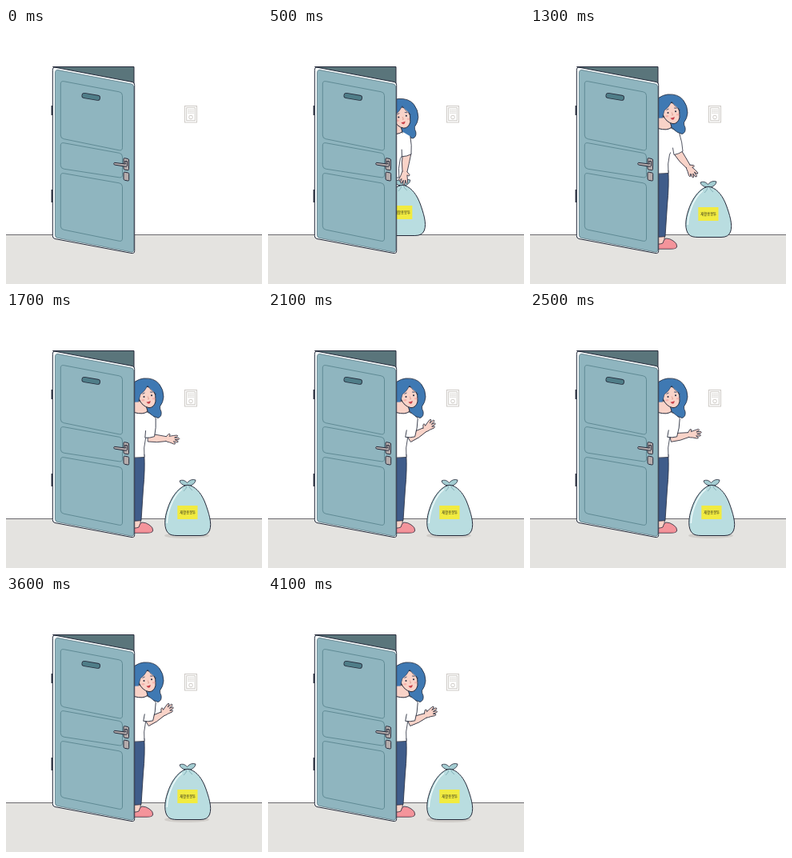
Recreate the animation shown at these times as an HTML page. Size 320x320 px, loop 4200 ms.

```html
<!DOCTYPE html>
<html lang="ko">
<head>
<meta charset="utf-8">
<title>Door</title>
<style>
  html, body { margin: 0; width: 100%; height: 100%; overflow: hidden; background: #fff; }
  svg { display: block; width: 100vw; height: 100vh; }
  .ink { stroke: #262b3b; stroke-width: 1; stroke-linejoin: round; stroke-linecap: round; }
  .thin { stroke-width: .8; }
  .line { fill: none; }
  .skin { fill: #f9d3c8; }
  .hair { fill: #3f79b3; }
  .panel { fill: none; stroke: #547f8a; stroke-width: .8; }
  .metal { fill: #b5acac; }
  .bell { fill: none; stroke: #c9c5c0; stroke-width: .9; }
  .label { font: 500 4.3px "Noto Sans CJK KR", "Noto Sans CJK", sans-serif; fill: #2c2c1c; text-anchor: middle; }
</style>
</head>
<body>
<svg viewBox="0 0 320 320">
  <defs>
    <clipPath id="outside"><rect x="160" y="0" width="160" height="320"/></clipPath>
  </defs>

  <rect width="320" height="320" fill="#fff"/>
  <rect y="258" width="320" height="62" fill="#e4e3e0"/>
  <path d="M0 258.500H320" stroke="#6c6b6e" stroke-width="1"/>

  <g class="bell">
    <rect x="223.500" y="97.500" width="15" height="20.500"/>
    <rect x="225.700" y="99.700" width="10.600" height="16"/>
    <path d="M227.500 102.300H235M227.500 104.300H235M227.500 106.300H235" stroke-dasharray="1.3 .7" stroke-width="1.100"/>
    <circle cx="231" cy="111.500" r="2.300"/>
  </g>

  <g clip-path="url(#outside)">
    <ellipse id="shadow" cx="226" cy="279.500" rx="28" ry="3.600" fill="#d0cdc9"/>

    <g id="legs">
      <path class="ink thin skin" d="M150 254H168.500L168 266L172 271H150Z"/>
      <path class="ink thin" fill="#3f5c8a" d="M145 178H172.800Q174 196 171.500 222L169 260.500Q162 262 145 260.500Z"/>
      <path class="ink thin" fill="#f4949b" d="M152 270Q161 271 166 269Q167 264 170 263Q175 263 179 266Q184 269 183.700 273Q183.500 276.200 176 276.200H152Z"/>
      <path d="M154 275.300H181" stroke="#dc7a84" stroke-width=".8"/>
    </g>

    <g id="girl">
      <path class="ink thin" fill="#fff" d="M145 127L170 123Q184 127 187 133L179 150L174.500 158Q171.500 170 173 181.500Q160 183 145 181Z"/>
      <path class="ink thin hair" d="M152 97Q160 84.500 172 83Q185 82 191.500 90Q197 97 197 106Q196.500 113 192.500 118Q192 121 194 124.500Q195 131 190 132.500Q183 131 178 125L163 118L150 118Z"/>
      <path class="ink skin" d="M160 111L165 110L175 117L177 124Q172 129 160 125.500Z" stroke-width=".6"/>
      <path class="ink skin" d="M166 98Q176 89 184 97Q188 104 187 112Q185 119.500 179 119.700Q170 118.500 166 108Z" stroke-width=".6"/>
      <path class="hair" d="M158 94Q166 84 178 86Q188 89 191 103Q183 100 177 92Q173 100 168 103Q166.500 109 165.500 112.500L158 113Z"/>
      <path class="line" d="M165.500 112.500Q166.500 109 168 103Q173 100 177 92Q181 99 188 103" stroke="#262b3b" stroke-width=".5"/>
      <path class="line" d="M170.500 102.500L173.500 101M180 100L183.300 100.300" stroke="#26395d" stroke-width=".8"/>
      <circle cx="172.500" cy="106" r="1" fill="#20263a"/>
      <circle cx="182" cy="104.300" r="1" fill="#20263a"/>
      <path class="line" d="M177.200 105.500L178.500 108.700L177.200 109" stroke="#cf8176" stroke-width=".6"/>
      <path d="M175.500 112.300Q178 112.700 180.700 111Q180.500 114.800 178.300 114.800Q176.300 114.600 175.500 112.300Z" fill="#c9414a"/>
      <ellipse cx="171.300" cy="110.300" rx="1.900" ry="1.300" fill="#f7b3ad"/>
      <ellipse cx="184.600" cy="108.300" rx="1.600" ry="1.200" fill="#f7b3ad"/>
    </g>

    <g id="bag">
      <path class="ink thin" fill="#a4cdd2" d="M225 217Q218 216 217 211Q222 208.500 226.500 213.500Q231 208 237 210Q236.500 215.500 229 217.300Z"/>
      <path class="ink" fill="#b9dde0" d="M223.500 217C214 221 206 233 202 246C198 257 197 271 203 276.500Q206 279.500 214 279.500H243Q252 279.500 254.500 273C258 264 253 250 249.500 240C245.500 229 239 220 230.500 217Q227 215.500 223.500 217Z"/>
      <path class="line" d="M220 221.500Q211.500 228 206 242Q201.500 254 201.300 264" stroke="#eef9fa" stroke-width="1.500"/>
      <path class="line" d="M226 217.500Q225.500 221 222 224M228.500 217.500Q230 221 233 223" stroke="#6f9ea8" stroke-width=".7"/>
      <rect x="214.300" y="242" width="25.200" height="17" fill="#f1eb40"/>
      <text class="label" x="227.200" y="252.300">재활용봉투</text>
    </g>

    <!-- Origin at the shoulder, forearm origin at the elbow -->
    <g id="arm">
      <g id="fore">
        <path class="ink thin skin" d="M-3 -4.800Q10 -4 21 -3V2.700Q9 6 -2 5.500Z"/>
        <path id="hand" class="ink thin skin" d="M20 -3L23 -6.500Q25 -7.200 24.700 -5.200L24 -3.600L29 -4.800L33.500 -5.500Q35.500 -4.500 33.500 -3.500L30.500 -2.300L36 -2.200Q37.500 -1 36 -.2L31 .2L35 1.700Q36 3.200 34 3.400L29.500 2.500L32 4.700Q32 6.200 30 5.700L25 4Q22 3.700 20 2.700"/>
      </g>
      <path fill="#fff" d="M-5 -6L5 -2L9 20Q4 23.500 -2 24.500L-8 20Z"/>
      <path class="ink thin line" d="M4.800 -2Q8.500 9 9 20Q4 23.500 -2 24.500L-3.500 16"/>
    </g>
  </g>

  <path class="ink" fill="#5a757b" d="M59 48.500H160V70L61 51Z"/>
  <path d="M57.500 97V109M57.500 202V218" stroke="#262b3b" stroke-width="1.800"/>
  <path class="ink" fill="#f4f9fa" stroke-width="1.400" d="M58.300 52Q58.300 48.800 62 49.300L158 67.500Q160.700 68.200 160.700 71.500V278.500Q160.700 282.200 157 281.500L61 263.500Q58.300 262.800 58.300 260Z"/>
  <path fill="#8fb5bf" stroke="#395b68" stroke-width=".6" d="M61.500 56Q61.500 52 65 52.500L157 70Q159.600 70.600 159.600 74V278Q159.600 280.700 156.500 280L64.500 262.500Q61.500 262 61.500 259Z"/>
  <g id="panels"></g>
  <path d="M98 84.500L114.500 87.300" stroke="#262b3b" stroke-width="7" stroke-linecap="round"/>
  <path d="M98 84.500L114.500 87.300" stroke="#4f7d88" stroke-width="5.400" stroke-linecap="round"/>
  <path class="ink metal" d="M147 163.500Q147 162.500 148.300 162.700L152.300 163.500Q153.500 163.800 153.500 165V176.500Q153.500 178 152 177.700L148 177Q147 176.700 147 175.500Z"/>
  <path class="ink metal" d="M149 166.500H151.500V172.500Q151 173.500 149 173.200L135.500 171Q133.800 169.800 135.500 168.300L149 170Z"/>
  <path class="ink metal" d="M147 181.500Q147 180 148.500 180.200L152.500 181Q153.700 181.300 153.700 182.500V189.500Q153.700 191.300 152.300 191L148.500 190.300Q147 190 147 188.500Z"/>
</svg>

<script>
  const LOOP = 4200, STEP = 100, WAVE = 700;
  const el = id => document.getElementById(id);
  const [legs, girl, bag, arm, fore, hand, shadow] =
    ["legs", "girl", "bag", "arm", "fore", "hand", "shadow"].map(el);

  // Skewed door panel: heights of top left, top right, bottom right, bottom left
  const panel = (a, b, c, d) => {
    const l = 68.3, r = 145.5, k = 4;
    return `<path class="panel" d="M${l} ${a + k}Q${l} ${a} ${l + k} ${a + .7}L${r - k} ${b - .7}` +
      `Q${r} ${b} ${r} ${b + k}V${c - k}Q${r} ${c} ${r - k} ${c - .7}L${l + k} ${d + .7}Q${l} ${d} ${l} ${d - k}Z"/>`;
  };
  el("panels").innerHTML =
    panel(66, 80.5, 153.5, 138) + panel(143, 157, 187.500, 175.5) + panel(181, 194.5, 267, 251.5);

  const ease = {
    out: p => 1 - (1 - p) ** 2,
    in: p => p * p,
    both: p => p * p * (3 - 2 * p)
  };
  const tween = (t, from, to, a, b, kind = "both") =>
    a + (b - a) * ease[kind](Math.min(1, Math.max(0, (t - from) / (to - from))));
  const place = (node, x, y, turn = 0) =>
    node.setAttribute("transform", `translate(${x} ${y}) rotate(${turn})`);

  function draw(t) {
    const enter = tween(t, 0, 600, -42, 0, "out");
    const x = enter + tween(t, 800, 1200, -8, 0);
    const y = tween(t, 800, 1200, 5.5, 0);
    place(girl, x, y);
    place(legs, tween(t, 800, 1200, -28, 0), 0);

    const bagX = enter + tween(t, 800, 1200, -58, -4) + tween(t, 1300, 1500, 0, 4);
    const bagY = tween(t, 800, 1200, -20, -18) + tween(t, 1300, 1500, 0, 18, "in");
    place(bag, bagX, bagY);
    shadow.setAttribute("opacity", tween(t, 1300, 1500, 0, 1, "in"));

    const swing = Math.cos((t - 2500) / WAVE * 2 * Math.PI);
    const upper = tween(t, 800, 1200, 8, 0) + tween(t, 1300, 1900, 0, 20);
    const reach = tween(t, 800, 1200, 98, 55);
    const lower = tween(t, 1300, 1900, reach, -18 + 10 * swing);
    place(arm, 182 + x, 134 + y * .5, upper);
    place(fore, 4, 22.5, lower - upper);
    const bend = tween(t, 1300, 1900, 0, 8 * (swing - 1));
    hand.setAttribute("transform", `rotate(${bend} 21 0)`);
  }

  function tick(now) {
    draw(Math.floor(now % LOOP / STEP) * STEP);
    requestAnimationFrame(tick);
  }
  draw(0);
  requestAnimationFrame(tick);
</script>
</body>
</html>
```
